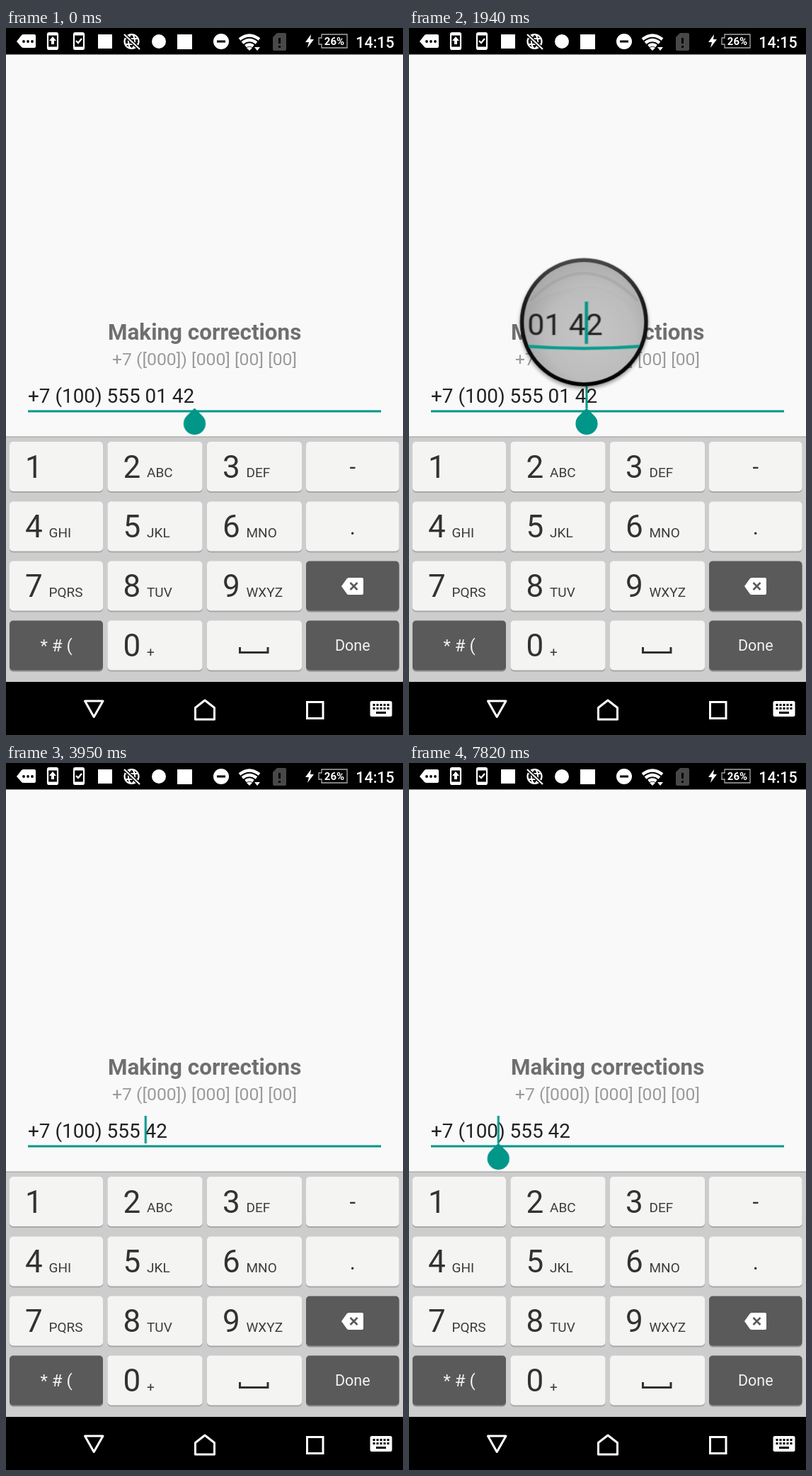
Animation, 561 px wide and 998 px high, one loop 8 s. Source, as an HTML page:

```html
<!DOCTYPE html>
<html lang="en">
<head>
<meta charset="utf-8">
<title>Making corrections</title>
<style>
  html, body { margin: 0; width: 100%; height: 100%; overflow: hidden; background: #f9f9f9; }
  svg { display: block; width: 100vw; height: 100vh; font-family: Roboto, sans-serif; }
  .line { fill: none; stroke: #fff; }
  .teal { fill: #009688; }
  .number { font-size: 27.9px; fill: #212121; white-space: pre; }
  .digit { font-size: 44px; fill: #323232; }
  .letters { font-size: 19px; fill: #3c3c3c; }

  .caret, .handle, .full, .shifted, .short, .pressable { animation: 8s step-end infinite; }
  .lens, .lens-move, .scan { animation: 8s linear infinite; }
  .caret { animation-name: caret; }
  .handle { animation-name: handle; }
  .full { animation-name: full; }
  .shifted { animation-name: shifted; }
  .short { animation-name: short; }
  .pressable { animation-name: press; }
  .lens { animation-name: fade; }
  .lens-move { animation-name: follow; }
  .scan { animation-name: scan; }

  @keyframes caret {
    0% { transform: translateX(266.5px); opacity: 0; }
    4.875% { opacity: 1; }
    11.625% { opacity: 0; }
    22.25% { transform: translateX(251px); opacity: 1; }
    26.25% { transform: translateX(235.5px); }
    36.75% { opacity: 0; }
    42.625% { transform: translateX(228.5px); opacity: 1; }
    46.5% { transform: translateX(213px); }
    49.375% { transform: translateX(197.3px); }
    56.125% { opacity: 0; }
    63% { opacity: 1; }
    68.75% { opacity: 0; }
    74.625% { opacity: 1; }
    81.375% { opacity: 0; }
    87.125% { opacity: 1; }
    93.875% { opacity: 0; }
    95.75%, 100% { transform: translateX(126.3px); opacity: 1; }
  }
  @keyframes handle {
    0% { transform: translateX(266.5px); opacity: 1; }
    22.25% { transform: translateX(251px); }
    26.25% { transform: translateX(235.5px); }
    43.625% { opacity: 0; }
    95.75%, 100% { transform: translateX(126.3px); opacity: 1; }
  }
  @keyframes full { 0% { opacity: 1; } 46.5%, 100% { opacity: 0; } }
  @keyframes shifted { 0% { opacity: 0; } 46.5% { opacity: 1; } 49.375%, 100% { opacity: 0; } }
  @keyframes short { 0% { opacity: 0; } 49.375%, 100% { opacity: 1; } }
  @keyframes press {
    0%, 42.625%, 46.5%, 49.375%, 100% { fill: #5a5a5a; }
    40.625%, 44.5%, 47.5% { fill: #787878; }
  }
  @keyframes fade {
    0%, 16.5% { opacity: 0; }
    18.875%, 30% { opacity: 1; }
    32.875%, 100% { opacity: 0; }
  }
  @keyframes follow {
    0%, 20.375% { transform: translate(257px, 403.5px); }
    24.25% { transform: translate(247.3px, 415.3px); }
    28.125%, 100% { transform: translate(240px, 415.3px); }
  }
  @keyframes scan {
    0%, 20.375% { transform: translateX(-258.5px); }
    24.25% { transform: translateX(-248.8px); }
    28.125%, 100% { transform: translateX(-241.5px); }
  }
</style>
</head>
<body>
<svg viewBox="0 0 561 998" preserveAspectRatio="none">
  <defs>
    <linearGradient id="rim" x2="0" y2="1">
      <stop offset="0" stop-color="#4a4a4a"/>
      <stop offset=".35" stop-color="#1c1c1c"/>
      <stop offset="1" stop-color="#020202"/>
    </linearGradient>
    <radialGradient id="glass" cx=".55" cy=".6" r=".62">
      <stop offset="0" stop-color="#c6c6c6"/>
      <stop offset=".6" stop-color="#bdbdbd"/>
      <stop offset="1" stop-color="#a0a0a0"/>
    </radialGradient>
    <linearGradient id="shine" x2="0" y2="1">
      <stop offset="0" stop-color="#fff" stop-opacity=".15"/>
      <stop offset="1" stop-color="#fff" stop-opacity="0"/>
    </linearGradient>
    <filter id="soft" x="-20%" y="-20%" width="140%" height="140%"><feGaussianBlur stdDeviation="2.5"/></filter>
    <clipPath id="disc"><circle r="85"/></clipPath>
  </defs>

  <rect width="561" height="998" fill="#f9f9f9"/>

  <!-- Status bar -->
  <rect width="561" height="37.400"/>
  <g fill="#fff">
    <path d="M15 19l7-9q1-1 3-1h15q2 0 2 2v15q0 2-2 2H25q-2 0-3-1z"/>
    <g fill="#000"><circle cx="25" cy="19" r="1.900"/><circle cx="31" cy="19" r="1.900"/><circle cx="37" cy="19" r="1.900"/></g>
    <g class="line" stroke-width="2.200">
      <rect x="59" y="7" width="14" height="23" rx="2"/>
      <rect x="96" y="7" width="14" height="23" rx="2"/>
      <path d="M59 9h14M59 28h14M96 9h14M96 28h14" stroke-width="3"/>
      <path d="M99 18l3 3 5-6"/>
      <circle cx="177.500" cy="19" r="10"/>
      <ellipse cx="177.500" cy="19" rx="4.500" ry="10"/>
      <path d="M168 15h19M168 23h19"/>
      <path d="M167 9l22 21" stroke="#000" stroke-width="5"/>
      <path d="M167 9l22 21"/>
    </g>
    <path d="M66 12l5 6h-3v5h-4v-5h-3z"/>
    <rect x="130" y="9" width="20" height="20"/>
    <circle cx="216" cy="19" r="10"/>
    <rect x="242" y="9" width="21" height="21"/>
    <circle cx="304" cy="19" r="11"/>
    <path d="M298 17.500h12v3h-12z" fill="#000"/>
    <g class="line" stroke-width="4.200">
      <path d="M330 16q14-11 28 0M334 21q10-8 20 0M338.500 25.500q5.500-4 11 0"/>
    </g>
    <path d="M340 28q4-3 8 0l-4 4zM351 27h8l-4 5z"/>
    <path d="M383 7h11q2 0 2 2v21q0 2-2 2h-15q-2 0-2-2V13z" fill="#484848"/>
    <path d="M385 14h3v8h-3zM385 25h3v3h-3z" fill="#000"/>
    <path d="M431 9l-8 11h5l-2 8 9-12h-5z"/>
    <path class="line" d="M446 9h36v19h-36v-5h-4v-9h4z" stroke-width="1.300" style="stroke:#aaa"/>
    <text x="464" y="24" font-size="15" font-weight="700" text-anchor="middle">26%</text>
    <text x="521.500" y="27.500" font-size="21.400" font-weight="500" text-anchor="middle">14:15</text>
  </g>

  <!-- Form -->
  <text x="280.700" y="440" font-size="31.400" font-weight="700" fill="#6f6f6f" text-anchor="middle">Making corrections</text>
  <text x="280.500" y="476" font-size="24.750" fill="#9b9b9b" text-anchor="middle">+7 ([000]) [000] [00] [00]</text>
  <g class="number">
    <text class="full" x="31" y="529">+7 (100) 555 01 42</text>
    <text class="shifted" x="31" y="529">+7 (100) 555 04 2</text>
    <text class="short" x="31" y="529">+7 (100) 555 42</text>
  </g>
  <rect class="teal" x="31" y="539.500" width="499" height="3"/>
  <rect class="teal caret" x="-1.500" y="498" width="3" height="39"/>

  <!-- Keyboard -->
  <rect y="577" width="561" height="346" fill="#cdcdcd"/>
  <rect y="576.500" width="561" height="1.200" fill="#a2a2a2"/>
  <g id="keys"></g>
  <path d="M330.500 874v7.500h39.500V874" fill="none" stroke="#303030" stroke-width="3"/>
  <path d="M474 788l7.500-10.500q1-1.500 3-1.500H503q2 0 2 2v20q0 2-2 2h-18.500q-2 0-3-1.500z" fill="#fff"/>
  <path d="M486.500 783l10 10m0-10l-10 10" stroke="#5a5a5a" stroke-width="2.600"/>

  <path class="teal handle" d="M0 536.500L11 547.500A15.600 15.600 0 1 1-11 547.500z"/>

  <!-- Navigation bar -->
  <rect y="923" width="561" height="75"/>
  <g class="line" stroke-width="3" stroke-linejoin="round">
    <path d="M111.500 950h25.500l-12.800 22.500z"/>
    <path d="M267.500 976v-16.500L281 949l13.500 10.500V976z"/>
    <path d="M425.500 951.500h22.500v23h-22.500z" stroke-linejoin="miter"/>
  </g>
  <rect x="514.500" y="950" width="31" height="22" rx="2.500" fill="#fff"/>
  <g stroke="#000" stroke-width="3">
    <path d="M518.500 955.500h23M518.500 960.500h23" stroke-dasharray="3 2"/>
    <path d="M523 966.500h14"/>
  </g>

  <!-- Magnifier -->
  <g class="lens"><g class="lens-move">
    <circle cy="3" r="91" opacity=".35" filter="url(#soft)"/>
    <circle r="90.500" fill="url(#rim)"/>
    <circle r="85" fill="url(#glass)"/>
    <g clip-path="url(#disc)">
      <path d="M-82-10A82 82 0 0 1 82-10Q40-62-20-48T-82-10z" fill="url(#shine)"/>
      <path d="M-76-30Q0-108 76-30" fill="none" stroke="#888" stroke-width="4" opacity=".25"/>
      <g transform="scale(1.53) translate(0 -517)">
        <g class="scan">
          <text class="number" x="31" y="529">+7 (100) 555 01 42</text>
          <rect class="teal caret" x="-1.500" y="498" width="3" height="39"/>
        </g>
      </g>
      <path d="M-88 33.500Q0 40.500 88 33.500" fill="none" stroke="#0b9c8e" stroke-width="4.500"/>
    </g>
  </g></g>
</svg>
<script>
  const columns = [[5, 132], [143.5, 134], [284, 134], [424, 131.5]];
  const rows = [584, 668.5, 752.5, 836.5];
  const labels = [
    ['1', '2 ABC', '3 DEF', '-'],
    ['4 GHI', '5 JKL', '6 MNO', '.'],
    ['7 PQRS', '8 TUV', '9 WXYZ', ''],
    ['* # (', '0 +', '', 'Done']
  ];
  const text = (x, y, attrs, label) => `<text x="${x}" y="${y}" ${attrs}>${label}</text>`;
  const centred = (size, fill) => `font-size="${size}" fill="${fill}" text-anchor="middle"`;

  function face(label, x, y, width) {
    const middle = x + width / 2;
    if (/^\d/.test(label)) {
      const [digit, letters = ''] = label.split(' ');
      const left = x + 22;
      return text(left, y + 50.5, 'class="digit"', digit) +
        text(left + 33.5, y + 50, 'class="letters"', letters);
    }
    if (label === 'Done') return text(middle, y + 42.5, centred(21.5, '#f2f2f2'), label);
    if (label[0] === '*') return text(middle, y + 43.5, centred(24, '#f2f2f2'), label);
    return text(middle, y + 46, centred(31, '#323232'), label);
  }

  document.getElementById('keys').innerHTML = rows.map((y, r) => columns.map(([x, width], c) => {
    const label = labels[r][c];
    const erase = r === 2 && c === 3;
    const dark = erase || (r === 3 && c % 3 === 0);
    const box = `x="${x}" width="${width}" height="70" rx="5"`;
    return `<rect ${box} y="${y + 2}" fill="${dark ? '#8e8e8e' : '#a8a8a8'}"/>` +
      `<rect ${box} y="${y}" fill="${dark ? '#5a5a5a' : '#f4f4f2'}"${erase ? ' class="pressable"' : ''}/>` +
      face(label, x, y, width);
  }).join('')).join('');
</script>
</body>
</html>
```
